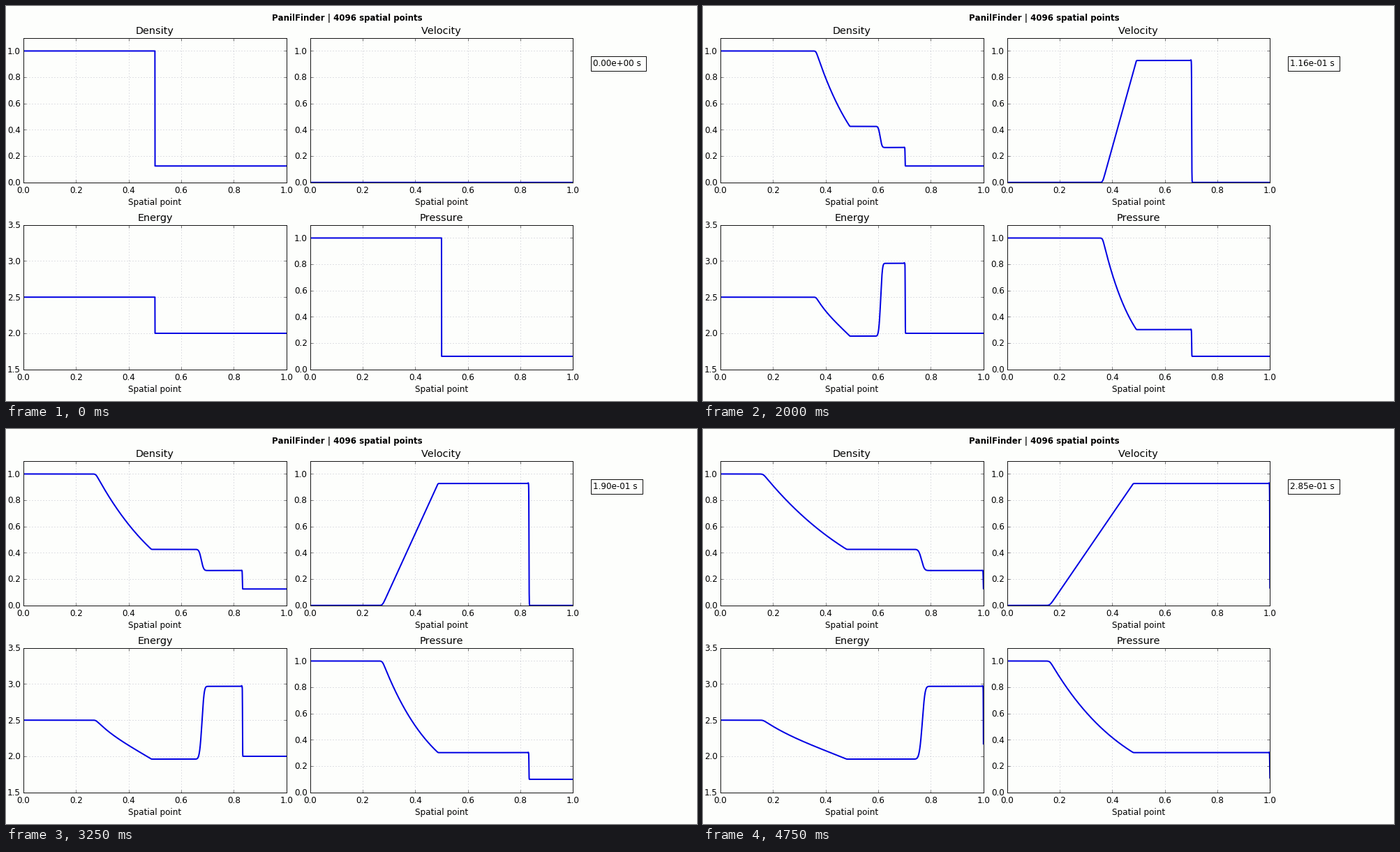
These frames come from a looping animation (990 px wide and 566 px high, 5000 ms). A matplotlib script:

```python
import math
import numpy as np
import matplotlib.pyplot as plt
from matplotlib.animation import FuncAnimation
from matplotlib.patches import Rectangle

W, H, DPI = 990, 566, 64
PX = 72 / DPI  # points per pixel
FRAMES, INTERVAL = 20, 250
BG, BLUE = "#fdfefc", "#0000e3"

plt.rcParams.update({
    "font.family": "DejaVu Sans",
    "lines.scale_dashes": False,
    "text.kerning_factor": 6,
})

# Shock tube states: left, right and the two star regions
A_L = math.sqrt(1.4)
RHO_R, P_R = 0.125, 0.1
P_S, U_S, RHO_SR = 0.30313, 0.92745, 0.26557
SHOCK, TAIL = 1.75216, -0.07027
X = np.linspace(0, 1, 4096)

fig = plt.figure(figsize=(W / DPI, H / DPI), dpi=DPI, facecolor=BG)


def label(x, y, text, size=12, **kw):
    return fig.text(x / W, 1 - y / H, text, fontsize=size * PX,
                    va="baseline", **kw)


def panel(left, right, top, bottom, title, ylim, yticks):
    ax = fig.add_axes([left / W, 1 - bottom / H,
                       (right - left) / W, (bottom - top) / H], facecolor=BG)
    xticks = np.arange(6) / 5
    ax.set(xlim=(0, 1), ylim=ylim, xticks=xticks, yticks=yticks)
    ax.tick_params(direction="in", top=True, right=True, length=4 * PX,
                   width=0.5 * PX, labelbottom=False, labelleft=False)
    ax.grid(color="#8888a0", lw=0.5 * PX, ls=(0, (PX, 3 * PX)))
    ax.set_axisbelow(True)
    for spine in ax.spines.values():
        spine.set(linewidth=PX, edgecolor="#161616")

    mid = (left + right) / 2
    label(mid, top - 5.8, title, 14.4, ha="center")
    label(mid, bottom + 32.2, "Spatial point", ha="center")
    for v in xticks:
        label(left + v * (right - left), bottom + 15, f"{v:.1f}", ha="center")
    for v in yticks:
        y = bottom - (v - ylim[0]) / (ylim[1] - ylim[0]) * (bottom - top)
        label(left - 4, y + 4.3, f"{v:.1f}", ha="right")
    return ax.plot([], [], color=BLUE, lw=2 * PX)[0]


def soft_ramp(x, w):
    return w * np.logaddexp(0, x / w)


def step_down(x, w):
    return 0.5 * (1 - np.tanh(x / w))


def gauss_down(x, sigma):
    """Falling error-function step."""
    z = np.clip(x / sigma, -8, 8)
    return step_down(0.7979 * z * (1 + 0.0447 * z * z), 1)


def solve(t):
    """Density, velocity, energy and pressure, with numerical smearing."""
    t = max(t, 1e-6)
    root, early = math.sqrt(t), min(1, t / 0.02)
    head, tail = 0.5 - A_L * t, 0.5 + TAIL * t
    contact = 0.5 + U_S * t
    front = 0.5 + SHOCK * t - 0.0004 * early

    u = U_S * (soft_ramp(X - head, 0.0065 * root)
               - soft_ramp(X - tail, 0.002 * root)) / (tail - head)
    a = 1 - 0.2 * u / A_L
    mix = gauss_down(X - contact, 0.016 * root)
    wiggle = np.exp(-((X - contact + 0.035 * root) / (0.0105 * root)) ** 2)
    rho = (a ** 5 + 0.01 * early * math.exp(-t / 0.03) * wiggle) * mix
    rho += RHO_SR * (1 - mix)
    p = a ** 7

    bump = early * np.exp(-((X - front + 0.003) / 0.0012) ** 2)
    s = step_down(X - front, 0.0007 * early)
    u = (u + 0.005 * bump) * s
    rho = RHO_R + (rho + 0.002 * bump - RHO_R) * s ** 2
    p = P_R + (p + 0.003 * bump - P_R) * s ** 1.5
    return rho, u, p / (0.4 * rho) + 0.5 * rho * u * u, p


def sim_time(frame):
    # the solver's output runs at 15 steps a second, after a short hold
    step = max(0, math.floor(3.75 * frame - 2))
    return 0.02053 + 0.004136 * (step - 5) if step else 0.0


COLS = (25, 401.8), (435.7, 812.3)
ROWS = (45.6, 252.8), (313.6, 520.8)
UNIT = (0, 1.1), np.arange(6) / 5
curves = [
    panel(*COLS[0], *ROWS[0], "Density", *UNIT),
    panel(*COLS[1], *ROWS[0], "Velocity", *UNIT),
    panel(*COLS[0], *ROWS[1], "Energy", (1.5, 3.5), np.arange(3, 8) / 2),
    panel(*COLS[1], *ROWS[1], "Pressure", *UNIT),
]
label(488.5, 21, "PanilFinder | 4096 spatial points", 11.8, weight="bold",
      ha="center")
clock_box = Rectangle((838, H - 93), 79, 21, fc=BG, ec="#101010", lw=PX,
                      transform=None)
fig.add_artist(clock_box)
clock = label(841, 85.8, "", ha="left")
clock.set_zorder(5)


def update(frame):
    t = sim_time(frame)
    for curve, values in zip(curves, solve(t)):
        curve.set_data(X, values)
    text = f"{t:.2e} s"
    clock.set_text(text)
    clock_box.set_width(79 if "+" in text else 74)
    return [*curves, clock, clock_box]


anim = FuncAnimation(fig, update, frames=FRAMES, interval=INTERVAL,
                     init_func=lambda: update(0), repeat=True,
                     repeat_delay=0, blit=False)
plt.show()
```
